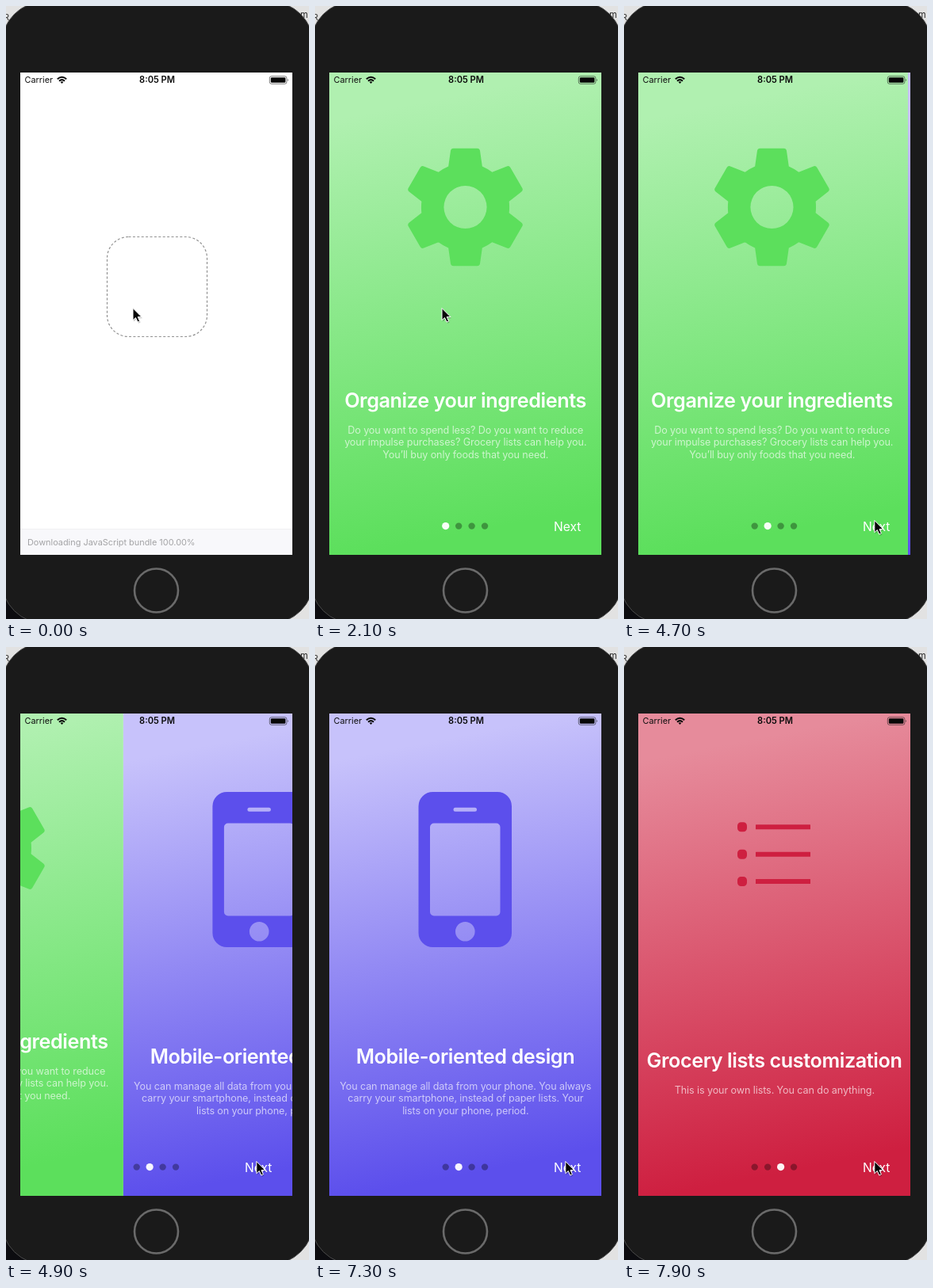
Write an HTML page that moves like this. It is 382 by 774 pixels and loops after 8 s.

```html
<!DOCTYPE html>
<html lang="en">
<head>
<meta charset="utf-8">
<title>Onboarding slides</title>
<style>
  html, body { margin: 0; width: 100%; height: 100%; overflow: hidden; background: #1a1a1a; }
  svg { display: block; width: 382px; height: 774px; }
  text { font-family: Inter, Roboto, sans-serif; }
  .title { font-size: 25.2px; font-weight: 600; letter-spacing: -.4px; fill: #fff; text-anchor: middle; }
  .body { font-size: 12.6px; letter-spacing: -.1px; fill: #fff; fill-opacity: .66; text-anchor: middle; }
  .small { font-size: 10.9px; }
</style>
</head>
<body>
<svg viewBox="0 0 382 774">
  <defs>
    <clipPath id="screen"><rect x="18" y="84" width="343" height="609"/></clipPath>
  </defs>

  <!-- desktop behind the device -->
  <rect width="382" height="774" fill="#e2e2e2"/>
  <rect y="700" width="40" height="74" fill="#0c0c10"/>
  <text x="-3" y="18" font-size="11" fill="#333">R</text>
  <text x="371" y="15" font-size="11" fill="#222">m</text>
  <rect x="-6" y="-6" width="394" height="786" rx="56" fill="#1a1a1a" stroke="#4a4a4a"/>
  <circle cx="189.5" cy="738" r="27.5" fill="none" stroke="#6a6a6a" stroke-width="2.6"/>

  <g clip-path="url(#screen)">
    <rect x="18" y="84" width="343" height="609" fill="#fff"/>
    <g id="splash">
      <rect x="127.5" y="291.5" width="126" height="126" rx="27" fill="none" stroke="#929292" stroke-width="1.2" stroke-dasharray="3 2.4"/>
      <rect x="18" y="660" width="343" height="33" fill="#f8f8fb"/>
      <path d="M18 660.5H361" stroke="#f0f0f2"/>
      <text class="small" x="27" y="681" fill="#a3a3a5">Downloading JavaScript bundle 100.00%</text>
    </g>
    <g id="intro">
      <g id="slides"></g>
      <g id="dots"></g>
      <text x="301" y="663" font-size="15.6" fill="#fff">Next</text>
    </g>
  </g>

  <!-- status bar -->
  <text class="small" x="23.5" y="97.3" fill="#111">Carrier</text>
  <g fill="none" stroke="#0a0a0a" stroke-width="2">
    <path d="M64.8 92.2Q70.5 87.2 76.2 92.2M67 94.7Q70.5 91.6 74 94.7"/>
    <path d="M68.6 96L70.5 98L72.4 96Q70.5 94.7 68.6 96Z" fill="#0a0a0a" stroke="none"/>
  </g>
  <text x="190.5" y="97.3" font-size="11.1" font-weight="600" text-anchor="middle" fill="#0a0a0a">8:05 PM</text>
  <rect x="332.3" y="88.7" width="21.6" height="9.6" rx="2.4" fill="none" stroke="#222" stroke-opacity=".65" stroke-width=".9"/>
  <rect x="333.8" y="90.2" width="18.6" height="6.6" rx="1.2" fill="#080808"/>
  <path d="M355 92Q356.6 93.5 355 95Z" fill="#333"/>

  <g id="cursor">
    <path d="M1 2V17L4.6 13.8L7 19.2L9.6 18L7.2 12.8H12Z" fill="#000" opacity=".22"/>
    <path d="M0 0V15.2L3.5 12L6 17.6L8.6 16.4L6.2 11.1H11Z" fill="#050505" stroke="#fff" stroke-width="1"/>
  </g>
</svg>

<script>
const LOOP = 8000, WIDTH = 343;
const ICON_AT = 1000, SPLASH_END = 400;
const SCROLLS = [[4680, 5060], [7420, 7800]];
const MOVE = { start: 2300, end: 3200, from: [160, 381.5], to: [315.8, 649.5] };

const $ = id => document.getElementById(id);
const clamp = v => Math.min(1, Math.max(0, v));
const ease = v => v * v * (3 - 2 * v);
const progress = (t, start, end) => ease(clamp((t - start) / (end - start)));

// Six equal teeth around a round hole.
function gearPath(cx, cy, size) {
  const at = (x, y, k) => {
    const a = k * Math.PI / 3, c = Math.cos(a), s = Math.sin(a);
    return `${(cx + size * (x * c - y * s)).toFixed(2)} ${(cy + size * (x * s + y * c)).toFixed(2)}`;
  };
  let d = '';
  for (let k = 0; k < 6; k++) {
    d += `${k ? 'L' : 'M'}${at(-2.76, -6.65, k)}L${at(-2.4, -9.19, k)}Q${at(-2.33, -9.6, k)} ${at(-1.92, -9.6, k)}` +
      `L${at(1.92, -9.6, k)}Q${at(2.33, -9.6, k)} ${at(2.4, -9.19, k)}L${at(2.76, -6.65, k)}` +
      `Q${at(3.62, -6.27, k)} ${at(4.38, -5.71, k)}`;
  }
  return d + 'Z' + circlePath(cx, cy, size * 3.5);
}

function circlePath(cx, cy, r) {
  return `M${cx - r} ${cy}a${r} ${r} 0 1 0 ${2 * r} 0a${r} ${r} 0 1 0 ${-2 * r} 0Z`;
}

function roundRect(x, y, w, h, r) {
  const arc = (dx, dy) => `a${r} ${r} 0 0 1 ${dx} ${dy}`;
  return `M${x + r} ${y}h${w - 2 * r}${arc(r, r)}v${h - 2 * r}${arc(-r, r)}` +
    `h${2 * r - w}${arc(-r, -r)}v${2 * r - h}${arc(r, -r)}Z`;
}

const phonePath = roundRect(130.5, 183, 117.5, 196, 18) + roundRect(174.5, 202.8, 29.5, 5, 2.5) +
  roundRect(145, 222.5, 88.5, 117, 5) + circlePath(189.3, 359.3, 12.3);

const listPath = [227.3, 261.7, 296]
  .map(y => roundRect(143, y - 6, 12, 12, 4.5) + roundRect(166, y - 3, 69, 6, .5)).join('');

const pages = [
  { light: '#b0f0b0', dark: '#5cdf5c', icon: gearPath(189.5, 254, 7.73), y: 507,
    title: 'Organize your ingredients',
    lines: ['Do you want to spend less? Do you want to reduce',
      'your impulse purchases? Grocery lists can help you.',
      'You’ll buy only foods that you need.'] },
  { light: '#c7c2fb', dark: '#5c4fec', icon: phonePath, y: 526,
    title: 'Mobile-oriented design',
    lines: ['You can manage all data from your phone. You always',
      'carry your smartphone, instead of paper lists. Your',
      'lists on your phone, period.'] },
  { light: '#e68b9b', dark: '#ce1f40', icon: listPath, y: 531,
    title: 'Grocery lists customization',
    lines: ['This is your own lists. You can do anything.'] }
];

$('slides').innerHTML = pages.map((p, i) => `
  <g transform="translate(${i * WIDTH})">
    <linearGradient id="shade${i}" x1="0" y1=".1" x2=".1" y2="1">
      <stop stop-color="${p.light}"/><stop offset="1" stop-color="${p.dark}"/>
    </linearGradient>
    <rect x="18" y="84" width="${WIDTH}" height="609" fill="url(#shade${i})"/>
    <path id="icon${i}" d="${p.icon}" fill="${p.dark}" fill-rule="evenodd"/>
    <g id="copy${i}">
      <text class="title" x="189.5" y="${p.y}">${p.title}</text>
      ${p.lines.map((line, n) => `<text class="body" x="189.8" y="${p.y + 33 + n * 15.4}">${line}</text>`).join('')}
    </g>
  </g>`).join('');

$('dots').innerHTML = [0, 1, 2, 3]
  .map(i => `<circle cx="${164.7 + i * 16.45}" cy="656.6"/>`).join('');
const dots = [...$('dots').children];

function draw(t) {
  const loaded = t >= SPLASH_END, hasIcon = t >= ICON_AT;
  $('splash').style.display = loaded ? 'none' : '';
  $('intro').style.display = loaded ? '' : 'none';
  $('icon0').style.display = hasIcon ? '' : 'none';
  $('copy0').setAttribute('transform', `translate(0 ${hasIcon ? 0 : -46.5})`);

  const scroll = SCROLLS.reduce((sum, [a, b]) => sum + progress(t, a, b), 0);
  $('slides').setAttribute('transform', `translate(${-scroll * WIDTH})`);

  const active = SCROLLS.filter(([start]) => t >= start).length;
  dots.forEach((dot, i) => {
    const on = i === active;
    dot.setAttribute('r', on ? 4.6 : 4.2);
    dot.setAttribute('fill', on ? '#fff' : '#000');
    dot.setAttribute('fill-opacity', on ? .95 : .33);
  });

  const m = progress(t, MOVE.start, MOVE.end);
  const [x, y] = MOVE.from.map((v, i) => v + (MOVE.to[i] - v) * m);
  $('cursor').setAttribute('transform', `translate(${x} ${y})`);
}

const begin = performance.now();
function tick() {
  draw((performance.now() - begin) % LOOP);
  requestAnimationFrame(tick);
}
tick();
</script>
</body>
</html>
```
